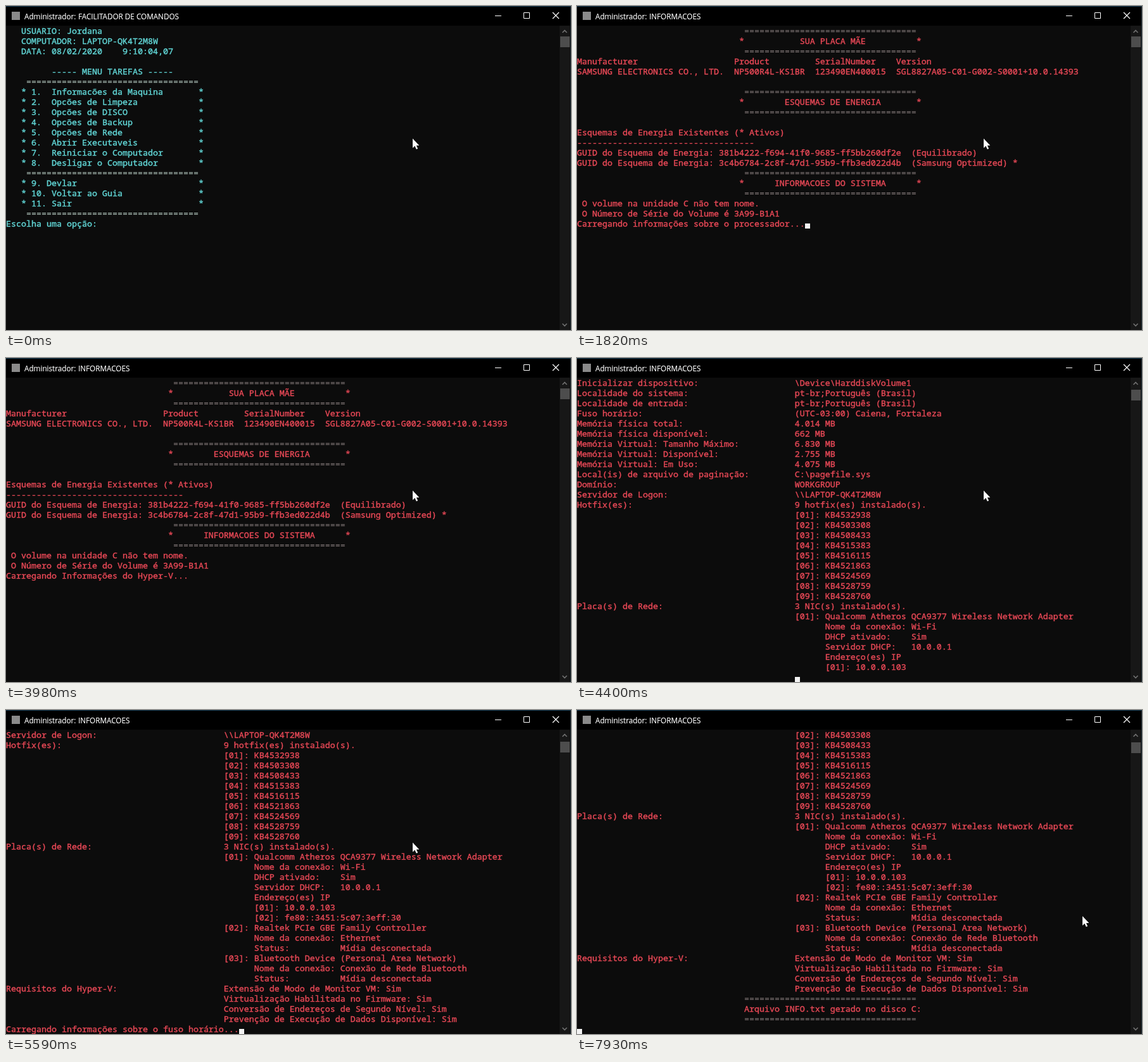
Write an HTML page that moves like this. It is 892 px wide and 511 px high and loops after 8000 ms.

```html
<!DOCTYPE html>
<html lang="pt-BR">
<head>
<meta charset="utf-8">
<title>Console</title>
<style>
  html, body { margin: 0; width: 100%; height: 100%; overflow: hidden; background: #0c0c0c; }
  #stage { position: relative; width: 892px; height: 511px; overflow: hidden; background: #0c0c0c; }
  #stage > * { position: absolute; }
  #bar { left: 0; top: 0; width: 892px; height: 31px; background: #000; box-sizing: border-box; border-top: 1px solid #1b4259; }
  .cap { top: 8px; font: 11.7px/16px "Open Sans", "Noto Sans", sans-serif; color: #fff; white-space: pre;
    -webkit-text-stroke: .15px; }
  #icon { left: 9px; top: 9px; width: 13px; height: 13px; background: #8a8a8a; }
  #text { left: 0; top: 31px; margin: 0; font: 500 calc(40px / 3)/16px "Noto Sans Mono", "DejaVu Sans Mono", monospace;
    font-variant-ligatures: none; color: #e74856; -webkit-text-stroke: .4px; }
  #text i { font-style: normal; font-weight: 400; color: #857b7b; -webkit-text-stroke: 0; }
  #text.menu { color: #61d6d6; }
  #text.menu i { color: #b4c8c0; }
  #caret { width: 8px; height: 8px; background: #f2f2f2; }
  #track { left: 874px; top: 31px; width: 16px; height: 480px; background: #171717; }
  #thumb { left: 875px; width: 15px; height: 17px; background: #4d4d4d; }
  #edge { left: 891px; top: 0; width: 1px; height: 511px; background: #26333b; }
  svg { left: 0; top: 0; fill: none; }
</style>
</head>
<body>
<div id="stage">
  <div id="bar"></div>
  <div id="icon"></div>
  <div class="cap" style="left:29px">Administrador:</div>
  <div class="cap" id="title" style="left:114px"></div>
  <pre id="text"></pre>
  <div id="caret"></div>
  <div id="track"></div>
  <div id="thumb"></div>
  <div id="edge"></div>
  <svg width="892" height="511">
    <g stroke="#fff">
      <path d="M772 15.5h10M817.5 10.5h9v9h-9z"/>
      <path d="M863 10l10 10M873 10l-10 10" stroke-width="1.2"/>
    </g>
    <path d="M878.5 42l3.5-3.5 3.5 3.5M878.5 501l3.5 3.5 3.5-3.5" stroke="#707070" stroke-width="1.6"/>
    <path id="mouse" d="M0 0V15L3.4 11.8 5.8 17 8.2 16 5.9 11H10.4Z" fill="#fff" stroke="#000" paint-order="stroke"/>
  </svg>
</div>
<script>
const $ = id => document.getElementById(id);

// Builds a line from column, text pairs.
const row = (...parts) => {
  let s = '';
  for (let i = 0; i < parts.length; i += 2) s = s.padEnd(parts[i]) + parts[i + 1];
  return s;
};
const rule = col => row(col, '='.repeat(34));
const task = (label, i) => row(3, `* ${i + 1}.`, 9, label, 38, '*');
const head = (col, label) => [rule(33), row(32, '*', col, label, 67, '*'), rule(33)];

const host = 'LAPTOP-QK4T2M8W';

const menu = [
  row(3, 'USUARIO: Jordana'),
  row(3, 'COMPUTADOR: ' + host),
  row(3, 'DATA: 08/02/2020', 23, '9:10:04,07'),
  '',
  row(9, '----- MENU TAREFAS -----'),
  rule(4),
  ...['Informacões da Maquina', 'Opcões de Limpeza', 'Opcões de DISCO', 'Opcões de Backup',
    'Opcões de Rede', 'Abrir Executaveis', 'Reiniciar o Computador', 'Desligar o Computador'].map(task),
  rule(4),
  row(3, '* 9. Devlar', 38, '*'),
  row(3, '* 10. Voltar ao Guia', 38, '*'),
  row(3, '* 11. Sair', 38, '*'),
  rule(4)
];
const prompt = 'Escolha uma opção: ';

const info = [
  ...head(44, 'SUA PLACA MÃE'),
  row(0, 'Manufacturer', 31, 'Product', 47, 'SerialNumber', 63, 'Version'),
  row(0, 'SAMSUNG ELECTRONICS CO., LTD.', 31, 'NP500R4L-KS1BR', 47, '123490EN400015', 63, 'SGL8827A05-C01-G002-S0001+10.0.14393'),
  '',
  ...head(41, 'ESQUEMAS DE ENERGIA'),
  '',
  'Esquemas de Energia Existentes (* Ativos)',
  '-'.repeat(35),
  'GUID do Esquema de Energia: 381b4222-f694-41f0-9685-ff5bb260df2e  (Equilibrado)',
  'GUID do Esquema de Energia: 3c4b6784-2c8f-47d1-95b9-ffb3ed022d4b  (Samsung Optimized) *',
  ...head(39, 'INFORMACOES DO SISTEMA'),
  ' O volume na unidade C não tem nome.',
  ' O Número de Série do Volume é 3A99-B1A1'
];

const field = (name, value) => row(0, name, 43, value);
const card = (n, name) => row(43, `[0${n}]: ${name}`);
const sub = (name, value) => row(49, name, 66, value);
const report = [
  field('Inicializar dispositivo:', '\\Device\\HarddiskVolume1'),
  field('Localidade do sistema:', 'pt-br;Português (Brasil)'),
  field('Localidade de entrada:', 'pt-br;Português (Brasil)'),
  field('Fuso horário:', '(UTC-03:00) Caiena, Fortaleza'),
  field('Memória física total:', '4.014 MB'),
  field('Memória física disponível:', '662 MB'),
  field('Memória Virtual: Tamanho Máximo:', '6.830 MB'),
  field('Memória Virtual: Disponível:', '2.755 MB'),
  field('Memória Virtual: Em Uso:', '4.075 MB'),
  field('Local(is) de arquivo de paginação:', 'C:\\pagefile.sys'),
  field('Domínio:', 'WORKGROUP'),
  field('Servidor de Logon:', '\\\\' + host),
  field('Hotfix(es):', '9 hotfix(es) instalado(s).'),
  ...[4532938, 4503308, 4508433, 4515383, 4516115, 4521863, 4524569, 4528759, 4528760]
    .map((kb, i) => card(i + 1, 'KB' + kb)),
  field('Placa(s) de Rede:', '3 NIC(s) instalado(s).'),
  card(1, 'Qualcomm Atheros QCA9377 Wireless Network Adapter'),
  sub('Nome da conexão:', 'Wi-Fi'),
  sub('DHCP ativado:', 'Sim'),
  sub('Servidor DHCP:', '10.0.0.1'),
  row(49, 'Endereço(es) IP'),
  row(49, '[01]: 10.0.0.103'),
  row(49, '[02]: fe80::3451:5c07:3eff:30'),
  card(2, 'Realtek PCIe GBE Family Controller'),
  sub('Nome da conexão:', 'Ethernet'),
  sub('Status:', 'Mídia desconectada'),
  card(3, 'Bluetooth Device (Personal Area Network)'),
  sub('Nome da conexão:', 'Conexão de Rede Bluetooth'),
  sub('Status:', 'Mídia desconectada'),
  field('Requisitos do Hyper-V:', 'Extensão de Modo de Monitor VM: Sim'),
  field('', 'Virtualização Habilitada no Firmware: Sim'),
  field('', 'Conversão de Endereços de Segundo Nível: Sim'),
  field('', 'Prevenção de Execução de Dados Disponível: Sim')
];

const about = what => `Carregando informações sobre ${what}...`;
const cpu = about('o processador');
const fixes = about('o hotfix');
const net = about('a placa de rede');
const zone = about('o fuso horário');
const hyper = 'Carregando Informações do Hyper-V...';
const tail = report.slice(11);
const end = [...report.slice(14), rule(33), row(33, 'Arquivo INFO.txt gerado no disco C:'), rule(33)];

// Start time, finished lines, current line, caret column (-1 hides it), thumb top.
const cues = [
  [0, menu, prompt, -1, 48],
  [280, menu, prompt, 19, 48],
  [430, menu, prompt + '1', 20, 48],
  [810, menu, prompt + '1', -1, 48],
  [1270, menu, prompt + '1', 20, 48],
  [1420, [...menu, prompt + '1'], '', 0, 48],
  [1570, info.slice(0, 3), '', 0, 48],
  [1690, info, '', 0, 48],
  [1820, info, cpu, cpu.length, 48],
  [2440, info, cpu, -1, 48],
  [2750, info, cpu, 0, 48],
  [2900, info, fixes, fixes.length, 48],
  [3050, info, net, net.length, 48],
  [3360, info, hyper, hyper.length, 48],
  [3980, info, hyper, -1, 48],
  [4400, report.slice(0, 29), '', 43, 50],
  [4560, tail, cpu, cpu.length, 50],
  [5590, tail, zone, zone.length, 50],
  [5740, tail, fixes, fixes.length, 50],
  [5890, tail, net, net.length, 50],
  [6040, tail, hyper, hyper.length, 50],
  [7130, end, '', 0, 51]
];

// Start time and tip of the pointer.
const moves = [
  [0, 642, 209], [7000, 662, 209], [7130, 676, 209], [7280, 710, 210], [7420, 742, 219],
  [7540, 769, 240], [7660, 787, 268], [7790, 796, 292], [7930, 798, 325]
];

const at = (list, t) => list.findLast(c => c[0] <= t);
const paint = line => line.replace(/={9,}/g, '<i>$&</i>');
let shown;

function show([time, lines, last, col, top]) {
  const first = time < 1570;
  $('title').textContent = first ? 'FACILITADOR DE COMANDOS' : 'INFORMACOES';
  $('text').className = first ? 'menu' : '';
  $('text').innerHTML = [...lines, last].map(paint).join('\n');
  $('caret').style.cssText = `left:${col * 8}px;top:${39 + lines.length * 16}px`;
  $('thumb').style.top = top + 'px';
}

function tick() {
  const t = performance.now() % 8000;
  const cue = at(cues, t);
  if (cue !== shown) show(shown = cue);
  const [, x, y] = at(moves, t);
  $('mouse').setAttribute('transform', `translate(${x} ${y})`);
  requestAnimationFrame(tick);
}
tick();
</script>
</body>
</html>
```
